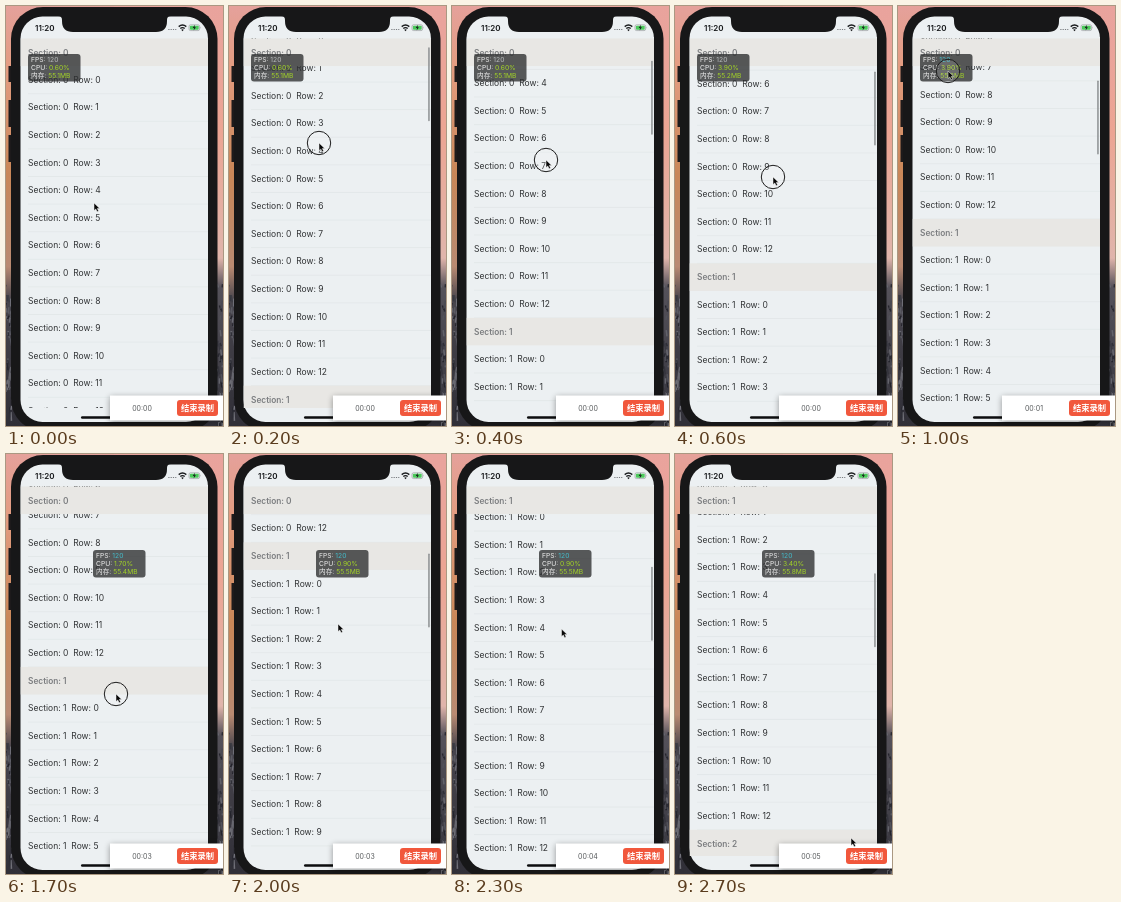
An HTML page that plays this animation: 217x420 px, repeating every 2.8 s.

```html
<!DOCTYPE html>
<html lang="zh">
<head>
<meta charset="utf-8">
<title>Table scroll recording</title>
<style>
html, body { margin: 0; width: 100%; height: 100%; overflow: hidden; }
svg { display: block; width: 217px; height: 420px; font-family: Inter, "Noto Sans CJK SC", "Noto Sans CJK", sans-serif; }
text { white-space: pre; }
.row { font-size: 8.5px; fill: #303234; }
.head { font-size: 8.3px; font-weight: 600; fill: #7c7e80; }
.stat { font-size: 6.7px; fill: #f4f4f4; }
.val { fill: #a3d426; }
</style>
</head>
<body>
<svg viewBox="0 0 217 420">
  <defs>
    <linearGradient id="left" x2="0" y2="1">
      <stop offset="0" stop-color="#e5a19b"/>
      <stop offset=".15" stop-color="#e39c80"/>
      <stop offset=".4" stop-color="#c98758"/>
      <stop offset=".62" stop-color="#b98a72"/>
      <stop offset=".7" stop-color="#48454d"/>
      <stop offset="1" stop-color="#302f37"/>
    </linearGradient>
    <linearGradient id="right" x2="0" y2="1">
      <stop offset="0" stop-color="#e9a39d"/>
      <stop offset=".3" stop-color="#eca593"/>
      <stop offset=".6" stop-color="#e0b5ab"/>
      <stop offset=".67" stop-color="#55525a"/>
      <stop offset="1" stop-color="#33323a"/>
    </linearGradient>
    <clipPath id="list"><rect x="14.5" y="32" width="187.5" height="370"/></clipPath>
    <filter id="soft" x="-20%" y="-50%" width="140%" height="200%"><feGaussianBlur stdDeviation="3"/></filter>
  </defs>

  <rect width="108" height="420" fill="url(#left)"/>
  <rect x="108" width="109" height="420" fill="url(#right)"/>
  <g id="rocks" stroke-width="1.5"></g>
  <path d="M2.5 60h4v16h-4zM2.5 94h4v27h-4zM2.5 129h4v27h-4z" fill="#1d1a1b"/>
  <rect x="5" y="1" width="206.5" height="424" rx="32" fill="#171718"/>
  <rect x="14.5" y="10.5" width="187.5" height="405.5" rx="22" fill="#ecf0f2"/>
  <path d="M52 10h113q-4 0-4 4v1q0 11-11 11H67q-11 0-11-11v-1q0-4-4-4z" fill="#171718"/>

  <text x="29" y="25" font-size="8" font-weight="600" fill="#17191b">11:20</text>
  <path d="M162.3 23.5h8" stroke="#777b7e" stroke-width="1.2" stroke-dasharray="1.2 1.1"/>
  <path d="M172.7 20.6q3.8-3.2 7.6 0M174.3 22.5q2.2-1.8 4.4 0" fill="none" stroke="#17191b" stroke-width="1.4"/>
  <path d="M175.2 23.8q1.3-1 2.6 0l-1.3 1.5z" fill="#17191b"/>
  <rect x="183" y="18.8" width="10.6" height="5.8" rx="1.6" fill="none" stroke="#8c9192" stroke-width=".6"/>
  <rect x="183.9" y="19.7" width="8.8" height="4" rx=".9" fill="#4bc95b"/>
  <path d="M188.9 18.8l-2.2 3.2h1.4l-.5 2.6 2.3-3.3h-1.4z" fill="#17191b"/>
  <path d="M194.5 20.8q1 .9 0 1.8z" fill="#8c9192"/>

  <g clip-path="url(#list)">
    <g id="rows"></g>
    <g id="heads"></g>
  </g>
  <rect id="bar" x="199.2" width="1.5" height="74" rx=".75" fill="#8d9092"/>
  <rect x="75" y="410.3" width="67" height="2.5" rx="1.2" fill="#0c0d0e"/>

  <g id="panel">
    <rect width="52.5" height="27.5" rx="3" fill="#2e2f31" fill-opacity=".79"/>
    <text class="stat" x="3" y="8.1">FPS: <tspan id="fps">120</tspan></text>
    <text class="stat" x="3" y="16">CPU: <tspan id="cpu" class="val"></tspan></text>
    <text class="stat" x="3" y="23.7">内存: <tspan id="mem" class="val"></tspan></text>
  </g>

  <rect x="104" y="391" width="120" height="25" fill="#000" opacity=".38" filter="url(#soft)"/>
  <rect x="104" y="389.5" width="113" height="25" fill="#fff"/>
  <text id="clock" x="136" y="404.6" font-size="7" text-anchor="middle" fill="#55585a"></text>
  <rect x="171" y="394" width="41" height="16" rx="3" fill="#f1573c"/>
  <text x="191.5" y="405.2" font-size="8.3" font-weight="700" text-anchor="middle" fill="#fff">结束录制</text>

  <g id="cursor">
    <circle id="touch" r="11.7" fill="#fff" fill-opacity=".12" stroke="#1c1c1c"/>
    <path d="M0 0v7.6l1.8-1.6 1.3 2.8 1.5-.7-1.3-2.7h2.4z" fill="#080808" stroke="#f4f4f4" stroke-width=".5"/>
  </g>
</svg>
<script>
const $ = id => document.getElementById(id);
const LOOP = 2800, STEP = 100, TOP = 32.5, ROW = 27.6, COUNT = 13;
const SECTION = ROW * (COUNT + 1);

// Pointer stops: time, x, y.
const stops = [[0, 88, 197], [200, 90, 137], [600, 98, 171], [1000, 50, 65], [1400, 114, 98],
  [1700, 110, 240], [2000, 109, 170], [2300, 109.5, 175], [2700, 176, 384]];
const cpu = ["0.60%", "3.90%", "1.70%", "0.90%", "3.40%"];
const mem = ["55.1MB", "55.2MB", "55.4MB", "55.5MB", "55.8MB"];

const progress = (t, start, length) => Math.min(1, Math.max(0, (t - start) / length));

function scrollAt(t) {
  const drag = 206 * Math.sin(Math.PI / 2 * progress(t, 92, 885));
  const fling = 238 * (1 - Math.exp(-Math.max(0, t - 1748) / 340));
  return drag + fling;
}

function pointerAt(t) {
  const i = Math.max(1, stops.findIndex(s => s[0] >= t));
  const [t0, x0, y0] = stops[i - 1], [t1, x1, y1] = stops[i];
  const p = progress(t, t0, t1 - t0);
  return [x0 + (x1 - x0) * p, y0 + (y1 - y0) * p];
}

function panelAt(t) {
  const p = progress(t, 1000, 500);
  return [22 + 65 * (1 - (1 - p) ** 1.6), 48 + 48 * p ** 4.5];
}

function buildList() {
  let rows = "", heads = "";
  for (let s = 0; s < 3; s++) {
    for (let r = 0; r < COUNT; r++) {
      const y = s * SECTION + (r + 1) * ROW;
      rows += `<text class="row" x="22" y="${y + 16.7}">Section: ${s}  Row: ${r}</text>
        <path d="M22 ${y + ROW}H202" stroke="#dde2e5" stroke-width=".6"/>`;
    }
    heads += `<g><rect x="14.5" width="187.5" height="${ROW}" fill="#e8e7e4"/>
      <text class="head" x="22" y="17.1">Section: ${s}</text></g>`;
  }
  $("rows").innerHTML = rows;
  $("heads").innerHTML = heads;
}

function buildRocks() {
  let seed = 7, lines = "";
  const rand = () => (seed = seed * 16807 % 2147483647) / 2147483647;
  for (let i = 0; i < 90; i++) {
    const x = (i % 2 ? 211 : 0) + rand() * 6, y = 278 + rand() * 140, g = 30 + rand() * 90;
    lines += `<path d="M${x} ${y}l${rand() * 3 - 1.5} ${3 + rand() * 6}" stroke="rgb(${g},${g},${g + 8})"/>`;
  }
  $("rocks").innerHTML = lines;
}

const move = (el, x, y) => el.setAttribute("transform", `translate(${x} ${y})`);
const show = (el, on) => el.setAttribute("visibility", on ? "visible" : "hidden");

function draw(t) {
  const scroll = scrollAt(t);
  move($("rows"), 0, TOP - scroll);
  [...$("heads").children].forEach((head, s) => {
    const own = TOP + s * SECTION - scroll;
    move(head, 0, Math.min(Math.max(own, TOP), own + SECTION - ROW));
  });

  $("bar").setAttribute("y", 33.3 + scroll * 0.2);
  show($("bar"), scroll - scrollAt(t - STEP) > 0.5);

  const sample = Math.floor((t + 50) / 650);
  move($("panel"), ...panelAt(t));
  $("cpu").textContent = cpu[sample];
  $("mem").textContent = mem[sample];
  $("fps").setAttribute("fill", t < 1000 ? "#b9bdbe" : "#43bccb");

  move($("cursor"), ...pointerAt(t));
  show($("touch"), t >= 100 && t < 1900);
  $("clock").textContent = "00:0" + Math.max(0, Math.floor((t - 200) / 500));
}

function tick() {
  const t = performance.now() % LOOP;
  draw(Math.floor(t / STEP) * STEP);
  requestAnimationFrame(tick);
}

buildList();
buildRocks();
tick();
</script>
</body>
</html>
```
